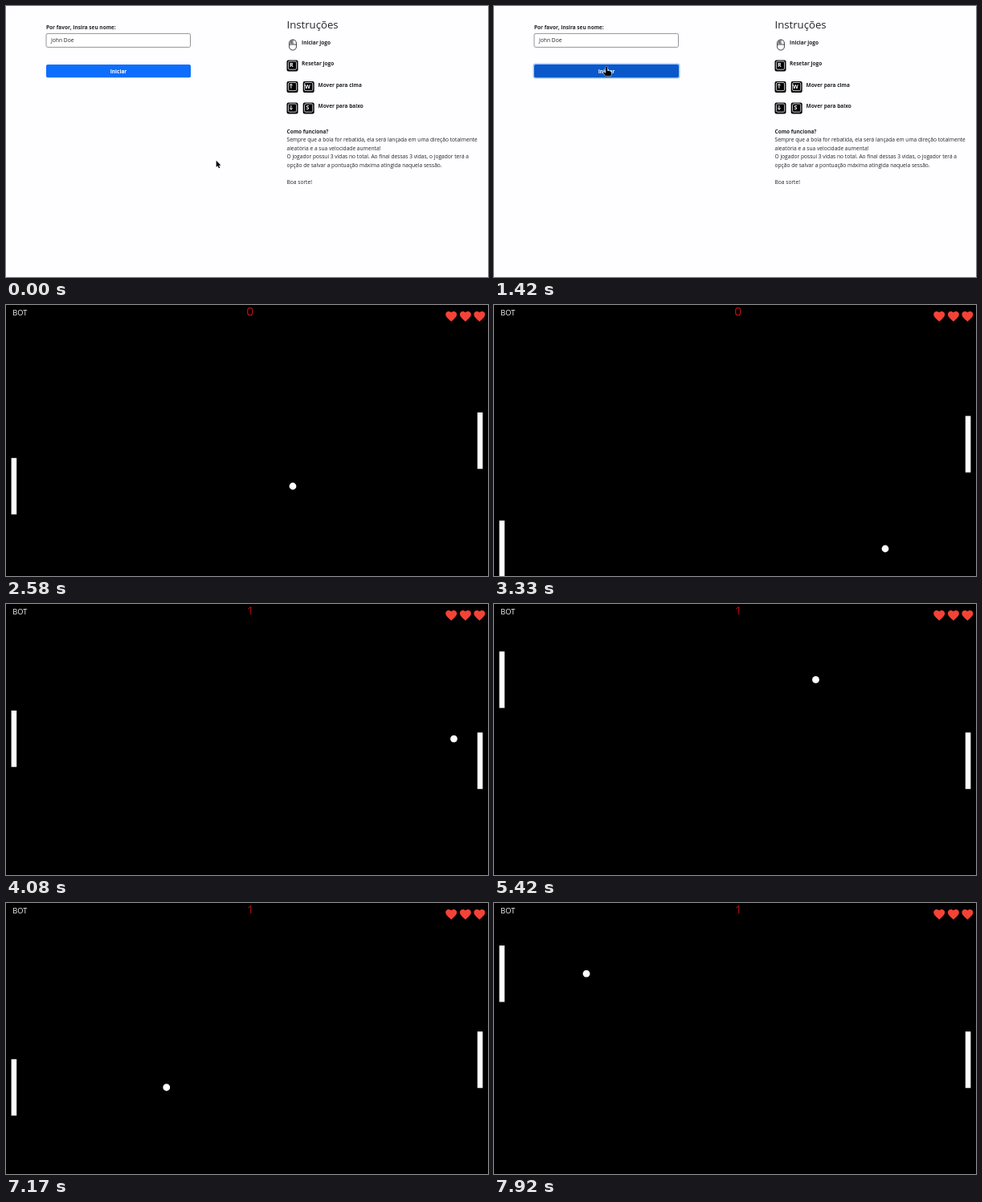
An HTML page with a canvas that plays this animation: 600x338 px, repeating every 8 s.

```html
<!DOCTYPE html>
<html lang="pt">
<head>
<meta charset="utf-8">
<style>
  html, body { margin: 0; width: 100%; height: 100%; overflow: hidden; background: #000; }
  canvas { display: block; width: 600px; height: 338px; }
</style>
</head>
<body>
<canvas id="stage" width="600" height="338"></canvas>
<script>
const ctx = document.getElementById('stage').getContext('2d');
const LOOP = 8000, STEP = 1000 / 12;
const FONT = '"Open Sans", sans-serif';
const HEART = new Path2D('M12 21.35l-1.45-1.32C5.4 15.36 2 12.28 2 8.5 2 5.42 4.42 3 7.5 3c1.74 0 3.41.81 4.5 2.09C13.09 3.81 14.76 3 16.5 3 19.58 3 22 5.42 22 8.5c0 3.78-3.4 6.86-8.55 11.54z');
const ARROW = new Path2D('M0 0V8.3L1.9 6.6 3.2 9.6 4.6 9 3.3 6.1H5.8Z');
const HAND = new Path2D('M-1 1Q0 -.8 1 1V5L5 6Q6.5 6.4 6.2 8L5.5 12H-1L-4 8Q-4.3 6.5 -2.8 7L-1 8.3Z');

const clamp = (v, lo, hi) => Math.min(hi, Math.max(lo, v));

// Piecewise linear value from [time, value] pairs.
function track(points, t) {
  if (t <= points[0][0]) return points[0][1];
  for (let i = 1; i < points.length; i++) {
    const [t0, a] = points[i - 1], [t1, b] = points[i];
    if (t <= t1) return a + (b - a) * (t - t0) / (t1 - t0);
  }
  return points[points.length - 1][1];
}

// Reflects an unbounded position between 0 and max.
function bounce(v, max) {
  const r = Math.abs(v) % (2 * max);
  return r > max ? 2 * max - r : r;
}

function text(str, x, y, size, weight = 400, color = '#212529', align = 'left') {
  ctx.font = `${weight} ${size}px ${FONT}`;
  ctx.fillStyle = color;
  ctx.textAlign = align;
  ctx.fillText(str, x, y);
}

function box(x, y, w, h, r, fill, stroke, line = 1) {
  ctx.beginPath();
  ctx.roundRect(x, y, w, h, r);
  if (fill) { ctx.fillStyle = fill; ctx.fill(); }
  if (stroke) { ctx.strokeStyle = stroke; ctx.lineWidth = line; ctx.stroke(); }
}

function lines(points, color, width) {
  ctx.beginPath();
  points.forEach(([x, y]) => ctx.lineTo(x, y));
  ctx.strokeStyle = color;
  ctx.lineWidth = width;
  ctx.stroke();
}

function keyIcon(x, y, label) {
  box(x, y, 14, 14, 2, '#000');
  box(x + 1.9, y + 1.5, 10.2, 10.2, 1.5, null, '#fff', 0.8);
  if (label === 'up' || label === 'down') {
    const dir = label === 'up' ? 1 : -1, cx = x + 5.4, cy = y + 6;
    lines([[cx, cy + 2.7 * dir], [cx, cy - 2.7 * dir]], '#fff', 1);
    lines([[cx - 1.8, cy - 0.8 * dir], [cx, cy - 2.7 * dir], [cx + 1.8, cy - 0.8 * dir]], '#fff', 1);
  } else {
    text(label, x + 5.8, y + 8.8, 7, 700, '#fff', 'center');
  }
}

function mouseIcon() {
  box(352.6, 42, 8.8, 13, 4.2, '#fff', '#222', 0.9);
  lines([[352.6, 48], [361.4, 48]], '#222', 0.8);
  lines([[357, 42], [357, 48]], '#222', 0.8);
  box(353.4, 42.8, 3.2, 4.6, 1.5, '#777');
}

function drawPointer(x, y, shape) {
  ctx.save();
  ctx.translate(x, y);
  ctx.lineWidth = 1;
  ctx.strokeStyle = '#fff';
  ctx.stroke(shape);
  ctx.fillStyle = '#000';
  ctx.fill(shape);
  ctx.restore();
}

function drawForm(f) {
  const p = clamp((f - 4) / 10, 0, 1), ease = p * p * (3 - 2 * p);
  const settle = f >= 15 ? 1 : 0;
  const x = 261.7 - 120.7 * ease - settle, y = 192.7 - 116.2 * ease - settle;
  const hover = x > 50 && x < 230 && y > 73 && y < 89;
  const pressed = f >= 17;

  ctx.fillStyle = '#fefdff';
  ctx.fillRect(0, 0, 600, 338);

  text('Por favor, insira seu nome:', 50, 29, 6.5, 700);
  box(50, 34.4, 179.5, 17, 2, '#fff', '#8b8789', 0.9);
  text('John Doe', 56, 45.4, 6.7);
  if (pressed) box(48.5, 71.5, 183, 19, 3, '#9ec5fe');
  box(50, 73, 180, 16.3, 2, pressed ? '#0a58ca' : hover ? '#0b5ed7' : '#0d6efd');
  text('Iniciar', 140, 83.6, 6.5, 700, '#fff', 'center');

  text('Instruções', 349.5, 28, 13.2, 500);
  mouseIcon();
  keyIcon(349.5, 67.5, 'R');
  keyIcon(349.5, 94, 'up');
  keyIcon(369.7, 94, 'W');
  keyIcon(349.5, 120.5, 'down');
  keyIcon(369.7, 120.5, 'S');
  text('Iniciar jogo', 368, 47.5, 6.5, 700);
  text('Resetar jogo', 368, 74, 6.5, 700);
  text('Mover para cima', 388.5, 100.5, 6.5, 700);
  text('Mover para baixo', 388.5, 127, 6.5, 700);

  text('Como funciona?', 349.5, 158.5, 6.5, 700);
  [
    'Sempre que a bola for rebatida, ela será lançada em uma direção totalmente',
    'aleatória e a sua velocidade aumenta!',
    'O jogador possui 3 vidas no total. Ao final dessas 3 vidas, o jogador terá a',
    'opção de salvar a pontuação máxima atingida naquela sessão.',
    '',
    'Boa sorte!'
  ].forEach((row, i) => text(row, 349.5, 169 + i * 10.55, 6.65));

  drawPointer(x, y, hover ? HAND : ARROW);
}

const HIT = { step: 46.4, x: 581.8, y: 208.7 };
const BALL_X = [[26.7, 295.5], [36, 428.5], [40, 487], [HIT.step, HIT.x],
                [49, 557.5], [65, 400.5], [76, 294], [95, 115]];

function ballAt(f) {
  const x = track(BALL_X, f);
  const y = f < HIT.step ? 164.5 + (x - 295.5) : HIT.y - (HIT.x - x) * 1.672;
  return { x, y: bounce(y, 330) };
}

function drawScore(score) {
  const red = '#d9100f';
  if (score) {
    lines([[301.3, 5.8], [302.6, 5.4], [304.8, 3.6], [304.8, 13]], red, 1);
  } else {
    lines([[302.3, 3.7], [305.3, 3.7], [306.8, 5.6], [306.8, 10.8], [305.3, 12.7],
           [302.3, 12.7], [300.8, 10.8], [300.8, 5.6], [302.3, 3.7], [305.3, 3.7]], red, 1.1);
  }
}

function drawGame(f) {
  const ball = ballAt(f);
  const botY = f < 27 ? 169 : ball.y;
  const playerTop = track([[39, 134], [45, 160.3]], f);

  ctx.fillStyle = '#000';
  ctx.fillRect(0, 0, 600, 338);
  text('BOT', 8.3, 13.2, 9.2, 400, '#fff');
  drawScore(f > HIT.step ? 1 : 0);

  for (const cx of [554.2, 571.9, 589.4]) {
    ctx.save();
    ctx.translate(cx - 8.4, 5.8);
    ctx.scale(0.7, 0.7);
    ctx.fillStyle = '#f44336';
    ctx.fill(HEART);
    ctx.restore();
  }

  ctx.fillStyle = '#fff';
  ctx.fillRect(6.6, botY - 35.2, 6.6, 70.4);
  ctx.fillRect(586.8, playerTop, 6.6, 70.4);
  ctx.beginPath();
  ctx.arc(ball.x, ball.y, 4.4, 0, Math.PI * 2);
  ctx.fill();
}

const start = performance.now();
function render() {
  const t = (performance.now() - start) % LOOP;
  const f = Math.floor((t + 5) / STEP) % 96;
  if (f < 18) drawForm(f); else drawGame(f);
  requestAnimationFrame(render);
}
render();
</script>
</body>
</html>
```
